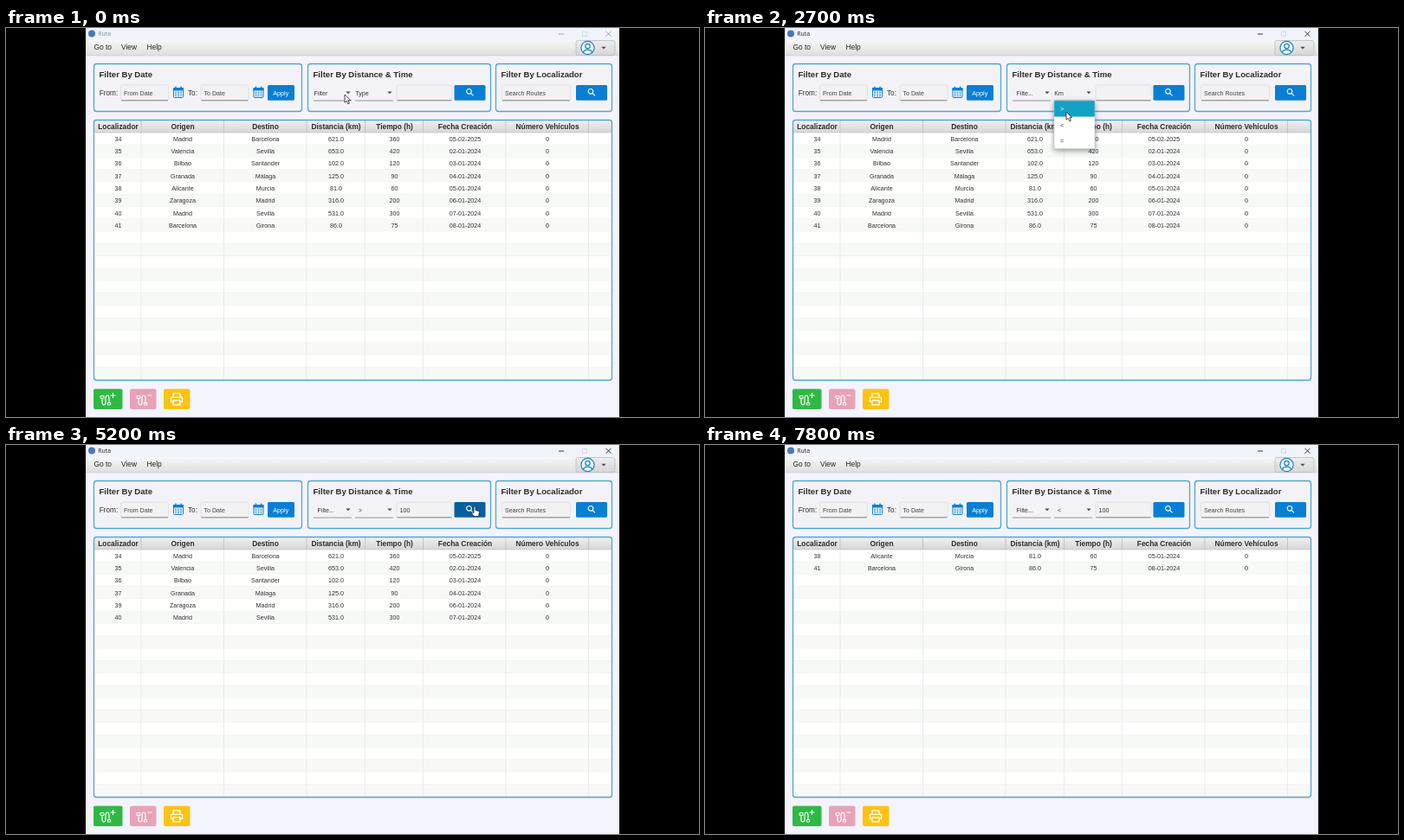
Animation, 800 px wide and 450 px high, one loop 7.9 s. Source, as an HTML page with a canvas:

```html
<!DOCTYPE html>
<html lang="es">
<head>
<meta charset="utf-8">
<title>Ruta</title>
<style>
html, body { margin: 0; width: 100%; height: 100%; overflow: hidden; background: #000; }
canvas { display: block; width: 800px; height: 450px; }
</style>
</head>
<body>
<canvas id="stage" width="800" height="450"></canvas>
<script>
const c = document.getElementById('stage').getContext('2d');
const LOOP = 7900, STEP = 100;
const BLUE = '#087fd4', DARK_BLUE = '#075f9e', TEAL = '#12a2c5', EDGE = '#55a6c8', INK = '#303030';
const SANS = '"Liberation Sans", Arial, sans-serif';

const headers = ['Localizador', 'Origen', 'Destino', 'Distancia (km)', 'Tiempo (h)', 'Fecha Creación', 'Número Vehículos'];
const colLines = [156, 251.5, 347, 414.5, 481.5, 577, 672.5];
const colMid = [129.5, 204, 299.5, 381, 448.5, 530, 625];
const routes = [
  ['Madrid', 'Barcelona', 621, 360, '05-02-2025'],
  ['Valencia', 'Sevilla', 653, 420, '02-01-2024'],
  ['Bilbao', 'Santander', 102, 120, '03-01-2024'],
  ['Granada', 'Málaga', 125, 90, '04-01-2024'],
  ['Alicante', 'Murcia', 81, 60, '05-01-2024'],
  ['Zaragoza', 'Madrid', 316, 200, '06-01-2024'],
  ['Madrid', 'Sevilla', 531, 300, '07-01-2024'],
  ['Barcelona', 'Girona', 86, 75, '08-01-2024']
].map(([from, to, km, time, date], i) => [34 + i, from, to, km.toFixed(1), time, date, 0]);

// Pointer path: time, x, y
const path = [
  [0, 391, 77], [400, 391, 77], [800, 393, 107], [1200, 393, 107],
  [1800, 425, 76], [2300, 425, 76], [2700, 417, 97], [2900, 417, 97],
  [3400, 470, 72], [4500, 470, 72], [4900, 541, 71], [5800, 541, 71],
  [6100, 432, 77], [6300, 428, 119], [6400, 428, 115], [6600, 428, 115],
  [7000, 538, 71], [7400, 538, 71]
];

function pointerAt(t) {
  const i = path.findIndex(p => p[0] > t);
  if (i < 0) return null;
  const [t0, x0, y0] = path[i - 1], [t1, x1, y1] = path[i];
  const k = (t - t0) / (t1 - t0), e = k * k * (3 - 2 * k);
  return [x0 + (x1 - x0) * e, y0 + (y1 - y0) * e];
}

function text(s, x, y, size = 7.2, color = INK, align = 'left', weight = '', family = SANS) {
  c.font = `${weight} ${size}px ${family}`;
  c.fillStyle = color;
  c.textAlign = align;
  c.fillText(s, x, y + size * .36);
}

function rect(x, y, w, h, fill) {
  c.fillStyle = fill;
  c.fillRect(x, y, w, h);
}

function box(x, y, w, h, r, fill, stroke, width = 1) {
  c.beginPath();
  c.roundRect(x, y, w, h, r);
  if (fill) { c.fillStyle = fill; c.fill(); }
  if (stroke) { c.strokeStyle = stroke; c.lineWidth = width; c.stroke(); }
}

function draw(d, x, y, stroke, width = 1, fill) {
  const p = new Path2D(d);
  c.save();
  c.translate(x, y);
  if (fill) { c.fillStyle = fill; c.fill(p); }
  if (stroke) { c.strokeStyle = stroke; c.lineWidth = width; c.stroke(p); }
  c.restore();
}

function fade(y0, y1, a, b) {
  const g = c.createLinearGradient(0, y0, 0, y1);
  g.addColorStop(0, a);
  g.addColorStop(1, b);
  return g;
}

const arrow = (x, y) => draw('M-2.6 -1.3H2.6L0 1.5Z', x, y, null, 1, '#4a4a4a');

function panel(x, w, title) {
  box(x + .5, 41.5, w - 1, 55, 3, '#f3f3f7', EDGE, 1.3);
  text(title, x + 6.5, 53.5, 9.55, '#2b2b2b', 'left', 'bold');
}

function field(x, w, label, color = '#444', line = '#858585') {
  box(x + .5, 66, w - 1, 18, 2, '#f2f2f2', '#dedee0', .8);
  rect(x + 1, 83.3, w - 2, 1, line);
  text(label, x + 4, 75, 7.1, color);
}

function combo(x, label, indent) {
  text(label, x + indent, 75, 7.1, '#333');
  arrow(x + 40, 74.7);
  rect(x, 83.6, 44, .9, '#8b8b8b');
}

function searchButton(x, hover) {
  box(x, 66, 36, 17.8, 1.5, hover ? DARK_BLUE : BLUE);
  draw('M2.8 0A2.8 2.8 0 1 1 -2.8 0A2.8 2.8 0 1 1 2.8 0M2 2L5 5', x + 17, 73.3, '#fff', 1.1);
}

function calendar(x) {
  box(x + .5, 69.5, 11, 11, 1, '#f6f9ff', BLUE, 1);
  rect(x, 69, 12, 3.5, BLUE);
  rect(x + 2.3, 67.5, 1.3, 2.5, BLUE);
  rect(x + 8.4, 67.5, 1.3, 2.5, BLUE);
  for (let i = 0; i < 9; i++) rect(x + 2.2 + i % 3 * 3, 73.7 + (i / 3 | 0) * 2.1, 1.7, 1.2, BLUE);
}

function popup(x, w, items, lit, pad) {
  const h = 18.6;
  c.save();
  c.shadowColor = 'rgba(0,0,0,.4)';
  c.shadowBlur = 6;
  c.shadowOffsetY = 2;
  rect(x, 84, w, h * items.length, '#fff');
  c.restore();
  items.forEach((item, i) => {
    const on = lit.includes(i), y = 84 + h * i;
    if (on) rect(x, y, w, h - (lit.includes(i + 1) ? .5 : 0), TEAL);
    text(item, x + pad, y + h / 2, 7.25, on ? '#fff' : '#333');
  });
  c.strokeStyle = '#b5c4c8';
  c.lineWidth = .6;
  c.strokeRect(x, 84, w, h * items.length);
}

function windowFrame(focused) {
  const tone = focused ? '#222' : '#999';
  rect(0, 0, 800, 450, '#000');
  rect(92, 0, 616, 450, '#f4f4fe');
  rect(92, 0, 616, 14, '#eff3fa');
  c.beginPath();
  c.arc(99, 6.5, 4, 0, 7);
  c.fillStyle = '#4b78b4';
  c.fill();
  text('Ruta', 106.3, 7, 6.9, focused ? '#222' : '#888', 'left', '', '"Open Sans", sans-serif');
  draw('M0 0H6', 638, 7, tone, .9);
  draw('M0 0H5V5H0Z', 665.5, 4.3, '#d0d2d8', .8);
  draw('M0 0L6 6M6 0L0 6', 692.5, 3.8, tone, .9);

  rect(92, 14, 616, 18, fade(14, 32, '#f7f7f7', '#dedede'));
  rect(92, 31.5, 616, .8, '#cfcfcf');
  ['Go to', 'View', 'Help'].forEach((s, i) => text(s, [101.5, 133, 162.5][i], 22, 8.4, '#262626'));
  box(658, 14.5, 45, 17, 2, fade(14, 32, '#eee', '#d6d6d6'), '#bdbdbd', .8);
  draw('M7.6 0A7.6 7.6 0 1 1 -7.6 0A7.6 7.6 0 1 1 7.6 0M2.7 -2A2.7 2.7 0 1 1 -2.7 -2A2.7 2.7 0 1 1 2.7 -2M-5 5.5C-4.5 1 4.5 1 5 5.5', 671.5, 23, '#1e83bd', 1.2, '#edf5fa');
  arrow(690, 23);
}

function table(rows) {
  const top = 121, h = 14.3;
  box(101.5, 106.5, 598, 301, 3, '#fefefe');
  rect(102, 107, 597, 14, fade(107, 121, '#f0f0f0', '#d6d6d6'));
  for (let i = 0; i < 20; i++) {
    rect(102, top + i * h, 597, h, i % 2 ? '#f7f9f7' : '#fffffe');
    rect(102, top + (i + 1) * h - .5, 597, .6, '#ececec');
  }
  colLines.forEach(x => {
    rect(x - .4, 107, .8, 14, '#bdbdbd');
    rect(x - .4, top, .8, 286, '#e6e8e7');
  });
  rect(102, 120.6, 597, .7, '#c4c4c4');
  headers.forEach((s, i) => text(s, colMid[i], 114, 8.4, '#2c2c2c', 'center', 'bold'));
  rows.forEach((row, r) => row.forEach((s, i) => text(s, colMid[i], top + 7.2 + r * h, 7.15, INK, 'center')));
  box(101.5, 106.5, 598, 301, 3, null, EDGE, 1.3);
}

function routeIcon(x, sign) {
  const tone = '#fff';
  draw('M-5 -2.5V3C-5 7 -1 7 -1 3V-2C-1 -6 3 -6 3 -2V4', x, 430, tone, 1.2);
  draw('M-7 -4.5H-3V-1.5H-7ZM1.3 3.5H4.7V6H1.3Z', x, 430, tone, .9);
  draw(sign, x + 4.5, 425, tone, 1);
}

function toolbar() {
  box(101, 417.5, 33.5, 23.5, 2, '#2fb944');
  box(143, 417.5, 30.5, 23.5, 2, '#e6a2b6');
  box(182, 417.5, 30.5, 23.5, 2, '#fcc313');
  routeIcon(116, 'M0 0H6M3 -3V3');
  routeIcon(158, 'M1 0H6');
  draw('M-4 -2V-6.5H3L4 -5.5V-2M-4 3H-6.5V-1.5Q-6.5 -2 -6 -2H6Q6.5 -2 6.5 -1.5V3H4M-4 1.5H4V6.5H-4Z', 197, 429.3, '#fff', 1.3);
}

function pointer(x, y) {
  const overButton = x > 517 && x < 554 && y > 65 && y < 84;
  if (overButton) {
    draw('M-1 0Q0 -1.2 1 0V4L4.8 5Q5.6 5.2 5.4 6.2L4.5 11H-1L-3.6 7.2Q-3.6 5.8 -1 7Z', x, y + .5, '#222', .8, '#fff');
  } else if (x > 451 && x < 515 && y < 84) {
    draw('M-2 -4.5H-.6L0 -4L.6 -4.5H2M0 -4V4M-2 4.5H-.6L0 4L.6 4.5H2', x, y, '#222', .9);
  } else {
    draw('M0 0V9.3L2.2 7.3L3.8 10.8L5.4 10.1L3.9 6.7H6.8Z', x, y, '#222', .8, '#fff');
  }
  return overButton;
}

function render(t) {
  const pos = pointerAt(t);
  const hover = pos && pos[0] > 517 && pos[0] < 554 && pos[1] > 65 && pos[1] < 84;
  const chosen = t >= 900;
  const op = t < 900 ? 'Type' : t < 2900 ? 'Km' : t < 6500 ? '>' : '<';
  const typed = '100'.slice(0, t < 3900 ? 0 : t < 4100 ? 1 : t < 4300 ? 2 : 3);
  const editing = t >= 3400 && t < 5000;
  const rows = routes.filter(r => t < 5000 || (t < 7200 ? r[3] > 100 : r[3] < 100));

  windowFrame(t >= 300);
  panel(101, 241, 'Filter By Date');
  text('From:', 107.8, 75, 8.2);
  field(132, 56, 'From Date');
  calendar(193);
  text('To:', 210, 75, 8.2);
  field(224.5, 56, 'To Date');
  calendar(285.5);
  box(302, 66, 31, 17.8, 1.5, BLUE);
  text('Apply', 317.3, 75, 7.2, '#fff', 'center');

  panel(348, 212, 'Filter By Distance & Time');
  combo(355, chosen ? 'Filte...' : 'Filter', chosen ? 4.5 : .5);
  combo(403, op, op.length > 1 ? .3 : 4);
  field(450.5, 65, typed, INK, editing ? '#4b5f93' : '#858585');
  if (editing && (t - 3400) % 1000 < 500) {
    c.font = `7.1px ${SANS}`;
    rect(454.3 + c.measureText(typed).width, 70, .8, 8.5, '#333');
  }
  searchButton(517.5, hover);

  panel(565, 135, 'Filter By Localizador');
  field(572, 80, 'Search Routes');
  searchButton(658, false);
  table(rows);
  toolbar();

  if (t >= 400 && t < 1100) {
    const lit = !pos || pos[1] < 84 ? [] : [pos[1] < 102.6 ? 0 : 1];
    popup(355, 88, ['Filter by Time', 'Filter by Distance'], lit, 7.3);
  }
  if (t >= 2300 && t < 2900 || t >= 6100 && t < 6500) {
    const lit = t > 6000 ? [0] : [];
    if (pos[1] >= 84) lit.push(Math.floor((pos[1] - 84) / 18.6));
    if (t >= 6300) lit[1] = 1;
    popup(403, 47, ['>', '<', '='], lit, 7);
  }
  if (pos) pointer(...pos);
}

const start = performance.now();
function tick(now) {
  const t = Math.max(0, now - start) % LOOP;
  render(Math.floor(t / STEP) * STEP);
  requestAnimationFrame(tick);
}
tick(start);
</script>
</body>
</html>
```
